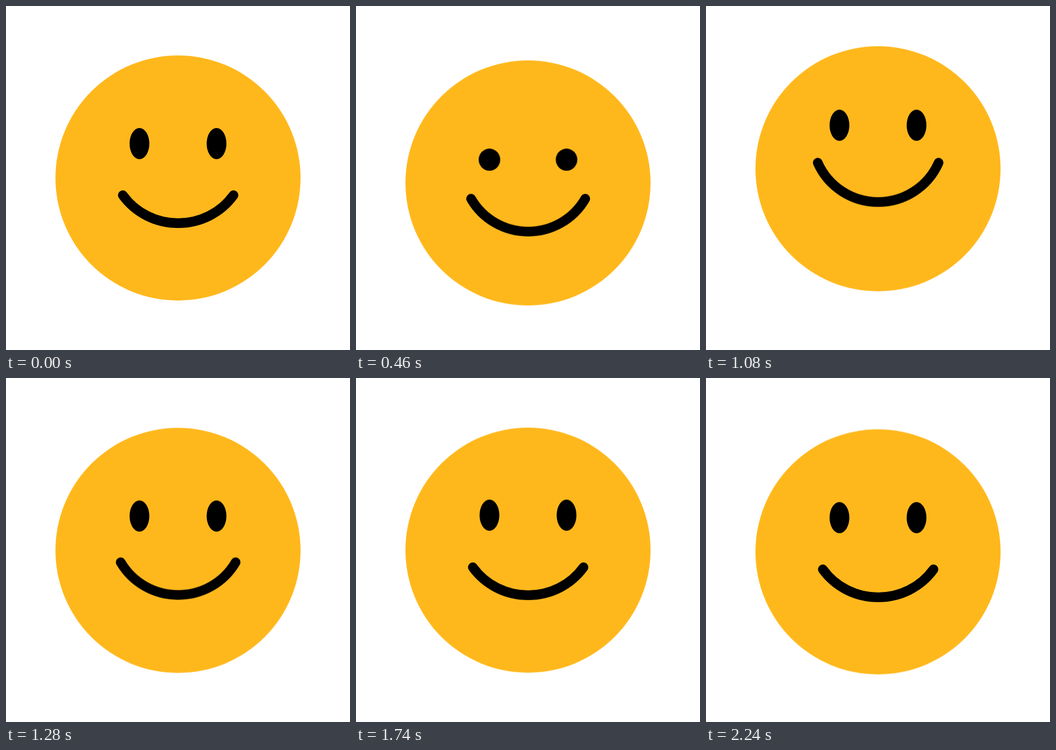
Animation of 640x640 px, one loop 2.58 s. Source, as an HTML page:

```html
<!DOCTYPE html>
<html lang="en">
<head>
<meta charset="utf-8">
<title>Nodding smiley</title>
<style>
  html, body { margin: 0; width: 100%; height: 100%; overflow: hidden; background: #fff; }
  svg { display: block; width: 100%; height: 100%; }

  .face, .eyes, .mouth { animation: nod 2580ms linear infinite; }
  .face  { --down: 37.3px; --up: -20px;   --dip: 13.4px; --lift: -.3px;  --rest: 3.5px; fill: #ffb81c; }
  .eyes  { --down: 96.6px; --up: -39.5px; --dip: 25.4px; --lift: -2px;   --rest: 3.8px; }
  .mouth { --down: 74.3px; --up: -45.3px; --dip: 27px;   --lift: -1.2px; --rest: 4px; }

  .eyes ellipse {
    transform-box: fill-box;
    transform-origin: center;
    animation: blink 2580ms linear infinite;
  }
  .mouth path {
    fill: none;
    stroke: #000;
    stroke-width: 18;
    stroke-linecap: round;
    animation: smile 2580ms linear infinite;
  }

  @keyframes nod {
    0%      { transform: translateY(0); }
    1.55%   { transform: translateY(0); animation-timing-function: cubic-bezier(.33, 0, .67, 1); }
    11.63%  { transform: translateY(var(--down)); animation-timing-function: cubic-bezier(.33, 0, .1, 1); }
    33.72%  { transform: translateY(var(--up)); animation-timing-function: cubic-bezier(.94, 0, .67, 1); }
    54.46%  { transform: translateY(var(--dip)); animation-timing-function: cubic-bezier(.33, 0, .67, 1); }
    69.38%  { transform: translateY(var(--lift)); animation-timing-function: cubic-bezier(.33, 0, .67, 1); }
    86.82%, 100% { transform: translateY(var(--rest)); }
  }

  @keyframes blink {
    0%     { transform: scale(1, 1); }
    1.55%  { transform: scale(1, 1); animation-timing-function: cubic-bezier(.33, 0, .67, 1); }
    11.63% { transform: scale(1.27, .12); animation-timing-function: cubic-bezier(.33, 0, .67, 1); }
    21.7%, 100% { transform: scale(1, 1); }
  }

  @keyframes smile {
    0%     { d: path("M-103 -52C-79 -19 -41 0 0 0C41 0 79 -19 103 -52"); }
    1.55%  { d: path("M-103 -52C-79 -19 -41 0 0 0C41 0 79 -19 103 -52"); animation-timing-function: cubic-bezier(.33, 0, .67, 1); }
    11.63% { d: path("M-99.5 -48C-75.4 -17.6 -38.8 0 0 0C38.8 0 75.4 -17.6 99.5 -48"); animation-timing-function: cubic-bezier(.33, 0, .1, 1); }
    33.72% { d: path("M-113.3 -75C-94 -29.5 -49.4 0 0 0C49.4 0 94 -29.5 113.3 -75"); animation-timing-function: cubic-bezier(.94, 0, .67, 1); }
    54.46%, 100% { d: path("M-103 -52C-79 -19 -41 0 0 0C41 0 79 -19 103 -52"); }
  }
</style>
</head>
<body>
<svg viewBox="0 0 640 640">
  <circle class="face" cx="320" cy="320" r="228"/>
  <g class="eyes">
    <ellipse cx="248.3" cy="256" rx="18.4" ry="28.9"/>
    <ellipse cx="391.7" cy="256" rx="18.4" ry="28.9"/>
  </g>
  <g class="mouth">
    <g transform="translate(320.3 404)">
      <path d="M-103 -52C-79 -19 -41 0 0 0C41 0 79 -19 103 -52"/>
    </g>
  </g>
</svg>
</body>
</html>
```
